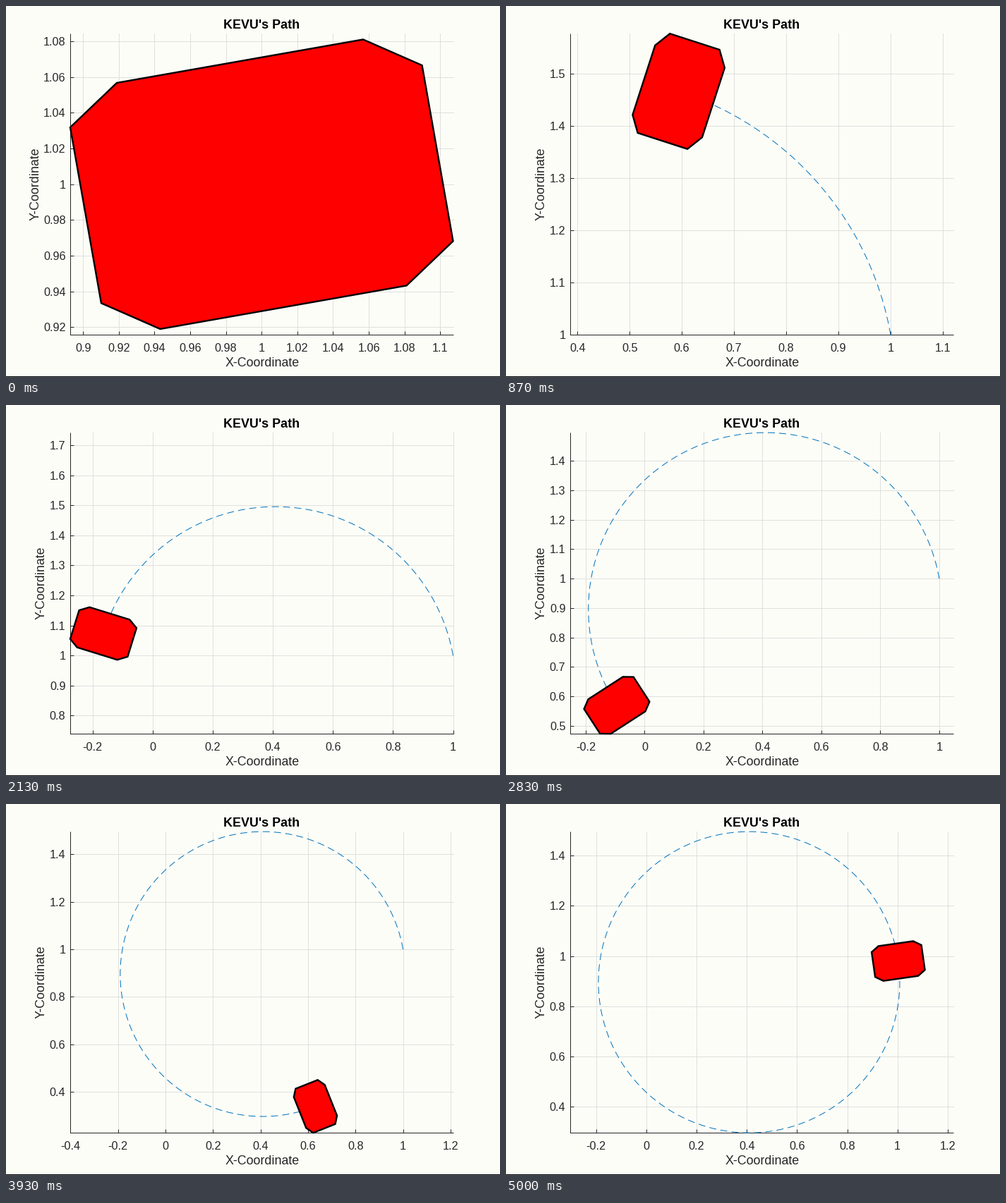
Animation, 700 px wide and 526 px high, one loop 5030 ms. Source, as a matplotlib script:

```python
import numpy as np
import matplotlib.pyplot as plt
from matplotlib.animation import FuncAnimation
from matplotlib.patches import Polygon, Rectangle

W, H, DPI = 700, 526, 100
PT = 72 / DPI  # points per pixel
TICK_MS, LOOP = 10, 5030
STEPS_PER_TICK = 0.3  # the drive is sampled 30 times a second
LEFT, RIGHT, TOP, BOTTOM = 91, 633.5, 39.2, 466.2
SIZE = np.array([RIGHT - LEFT, BOTTOM - TOP])
MID = np.array([LEFT + RIGHT, TOP + BOTTOM]) / 2
PAPER, INK, GRID = "#fdfdf8", "#262626", "#dfdfdc"
GAP = (np.nan, np.nan)

# Circular drive: starts at (1, 1) and turns 1/24 rad per step
RADIUS, START, TURN = 0.6, np.radians(10), 1 / 24
CENTRE = 1 - RADIUS * np.array([np.cos(START), np.sin(START)])
BODY = np.array([(.07, .07), (.1, .05), (.1, -.05), (.07, -.07),
                 (-.07, -.07), (-.1, -.05), (-.1, .05), (-.07, .07)])

plt.rcParams["font.family"] = "Liberation Sans"
fig = plt.figure(figsize=(W / DPI, H / DPI), dpi=DPI, facecolor=PAPER)
# The stage is laid out in pixels with y pointing down
ax = fig.add_axes([0, 0, 1, 1], xlim=(0, W), ylim=(H, 0))
ax.set_axis_off()


def label(x, y, text="", size=17.9, color=INK, ha="center", va="baseline", **style):
    return ax.text(x, y, text, size=size * PT, color=color, ha=ha, va=va, **style)


def line(color, **style):
    return ax.plot([], [], color=color, lw=PT, **style)[0]


label(MID[0], 32, "KEVU's Path", weight="bold", color="black")
label(MID[0] + 0.5, 511, "X-Coordinate")
y_label = label(0, MID[1], "Y-Coordinate", rotation=90, rotation_mode="anchor")
x_ticks = [label(0, 490, size=16.2) for _ in range(14)]
y_ticks = [label(84.5, 0, size=16.2, ha="right", va="center_baseline")
           for _ in range(14)]

grid = line(GRID, snap=True, zorder=1)
rulers = line(INK, snap=True, zorder=1.5, solid_capstyle="butt")
trail = line("#0072bd", ls=(0, (10, 6)), dash_capstyle="butt", zorder=2)
robot = ax.add_patch(Polygon(BODY, fc="red", ec="black", lw=2.4 * PT,
                             joinstyle="miter", zorder=3))
ax.add_patch(Rectangle((0, H - 1), W, 1, fc="black", ec="none"))


def tick_values(low, high):
    """Multiples of the smallest 1-2-5 step giving at most 11 intervals."""
    step = next(m * 10.0 ** e for e in range(-3, 1) for m in (1, 2, 5)
                if (high - low) / (m * 10.0 ** e) <= 11)
    first, last = np.ceil(low / step - 1e-6), np.floor(high / step + 1e-6)
    return np.round(np.arange(first, last + 1) * step, 6) + 0.0, step


def fit_view(points):
    """Equal-scale view, tight on the longer side and centred on the other."""
    low, high = points.min(axis=0), points.max(axis=0)
    return (low + high) / 2, (SIZE / (high - low)).min()


def set_labels(pool, values, spots, move):
    for text in pool:
        text.set_visible(False)
    for text, value, spot in zip(pool, values, spots):
        text.set(text=f"{value:g}", visible=True)
        move(text, spot)


def update(tick):
    step = int(tick * STEPS_PER_TICK + 0.15)
    angles = START + TURN * np.arange(step + 1)
    path = CENTRE + RADIUS * np.column_stack([np.cos(angles), np.sin(angles)])
    c, s = np.cos(angles[-1]), np.sin(angles[-1])
    outline = BODY @ np.array([[c, s], [-s, c]]) + path[-1]

    focus, scale = fit_view(np.vstack([path, outline]))
    flip = np.array([scale, -scale])
    trail.set_data(*(MID + (path - focus) * flip).T)
    robot.set_xy(MID + (outline - focus) * flip)

    low, high = focus - SIZE / scale / 2, focus + SIZE / scale / 2
    xs, _ = tick_values(low[0], high[0])
    ys, y_step = tick_values(low[1], high[1])
    px = MID[0] + (xs - focus[0]) * scale
    py = MID[1] - (ys - focus[1]) * scale
    set_labels(x_ticks, xs, px, lambda t, v: t.set_x(v))
    set_labels(y_ticks, ys, py, lambda t, v: t.set_y(v))
    y_label.set_x(46.5 if y_step < 0.099 else 55)

    bars, marks = [], [(LEFT, TOP), (LEFT, BOTTOM), GAP,
                       (LEFT, BOTTOM), (RIGHT, BOTTOM), GAP]
    for x in px:
        bars += [(x, TOP), (x, BOTTOM), GAP]
        marks += [(x, BOTTOM), (x, BOTTOM - 5.4), GAP]
    for y in py:
        bars += [(LEFT, y), (RIGHT, y), GAP]
        marks += [(LEFT, y), (LEFT + 5.4, y), GAP]
    grid.set_data(*np.array(bars).T)
    rulers.set_data(*np.array(marks).T)
    return grid, rulers, trail, robot


anim = FuncAnimation(fig, update, frames=LOOP // TICK_MS, interval=TICK_MS,
                     init_func=lambda: update(0), repeat=True, repeat_delay=0,
                     blit=False)
plt.show()
```
